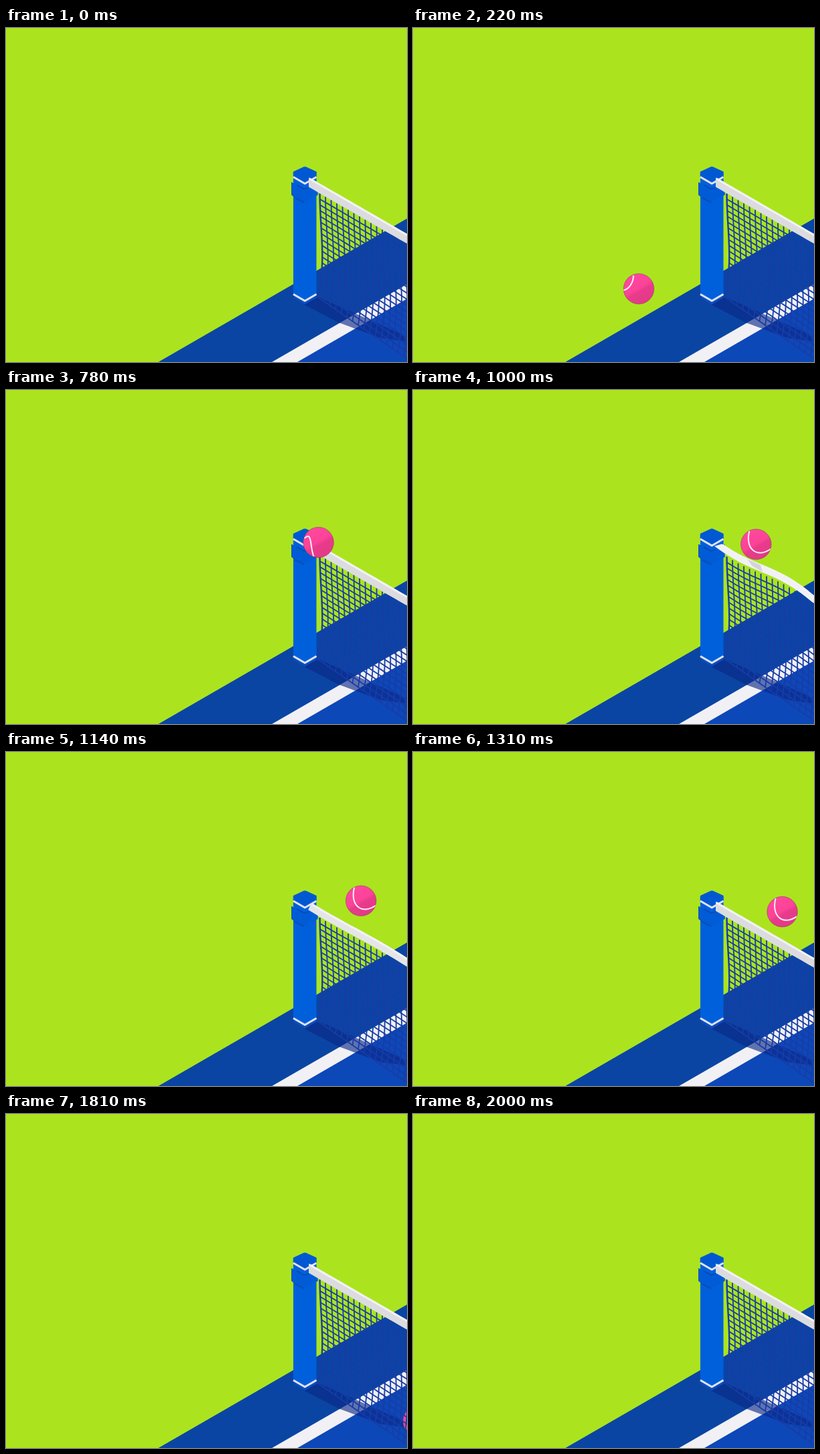
Animation of 600x500 px, one loop 2.5 s. Source, as an HTML page with a canvas:

```html
<!DOCTYPE html>
<html lang="en">
<head>
<meta charset="utf-8">
<title>Net cord</title>
<style>
  html, body { margin: 0; width: 100%; height: 100%; overflow: hidden; background: #abe41f; }
  canvas { display: block; width: 600px; height: 500px; }
</style>
</head>
<body>
<canvas id="stage" width="600" height="500"></canvas>
<script>
const ctx = document.getElementById('stage').getContext('2d');

const LOOP = 2500, STEP = 2000 / 72, LAST = 72;
const HIT = 953;                          // the ball touches the tape
const ISO = Math.tan(Math.PI / 6);        // slope of every ground line
const POST = 447.2, HALF = 17.3;          // post centre and half width
const NET = 453;                          // left end of the tape
const RADIUS = 22.8;
const ROWS = 18, COLS = 18, GAP = 8.5;

const lerp = (a, b, u) => a + (b - a) * u;
const clamp = (v, lo = 0, hi = 1) => Math.min(hi, Math.max(lo, v));
const series = (n, make) => Array.from({ length: n + 1 }, (_, i) => make(i / n));

function trace(points) {
  ctx.beginPath();
  points.forEach(([x, y]) => ctx.lineTo(x, y));
}
function fill(color, points) {
  trace(points);
  ctx.fillStyle = color;
  ctx.fill();
}
function line(color, width, points) {
  trace(points);
  ctx.strokeStyle = color;
  ctx.lineWidth = width;
  ctx.stroke();
}

// Court

// Ground to the right of a line that leaves the bottom edge at x
function ground(color, x) {
  fill(color, [[x, 500], [600, 500 - (600 - x) * ISO], [600, 500]]);
}

function drawCourt() {
  ctx.fillStyle = '#abe41f';
  ctx.fillRect(0, 0, 600, 500);
  ground('#0a45a4', 228);
  ground('#f1f0f4', 398);
  ground('#0d48b9', 436);
  fill('rgba(9,40,134,.62)', [[444, 413], [468, 403], [594, 459], [598, 469], [560, 464], [498, 441]]);
}

// Post

// A band edge seen from above: low in the middle
const vee = (y, grow = 0) => [[POST - HALF - grow, y], [POST, y + 10], [POST + HALF + grow, y]];
const block = (color, y0, y1, grow) => fill(color, [...vee(y0, grow), ...vee(y1, grow).reverse()]);

function drawPost() {
  block('#0a4fc0', 395, 404, -1);
  block('#0060dc', 222, 399);
  line('#e4e3ee', 3, vee(398.5));

  block('#005cd6', 231, 250, 2.2);
  line('#0b48ae', 1, [[427.5, 231], [427.5, 250], [432, 253]]);
  line('#0b48ae', 1.5, [[435, 235], [446, 241], [453, 239]]);
  line('#0c4cb4', 2, [[432, 254], [446, 261]]);

  const cap = [[POST, 208.5], ...vee(216, -1).slice(2), ...vee(222, -1).reverse(), ...vee(216, -1).slice(0, 1)];
  fill('#0059d2', cap);
  line('#0059d2', 2.5, [...cap, cap[0]]);
  line('#e4e3ee', 3, vee(223));
}

// Net

function liftAt(t) {
  const s = t - HIT;
  if (s <= 0 || s > 330) return 0;
  return 9 * Math.min(1, s / 20) * Math.exp(-s / 100) * Math.sin(2 * Math.PI * (s - 14) / 130);
}
// Dips beside the post while it rises further along
function sway(x) {
  const u = clamp((x - NET) / 147);
  return Math.sin(Math.PI * u) * (4 * u - 1.5);
}
const tapeY = (x, drop, lift) => 224 + drop + (x - NET) * ISO - lift * sway(x);

function netPoint(x, u, lift) {
  const bend = 5 * Math.sin(Math.PI * u ** 1.5) - 2 * u;
  const foot = 402 + (x - 467) * .69;
  return [x + bend, lerp(tapeY(x, 14, lift), foot, u)];
}

function drawMesh(lift) {
  const left = 469.5, color = '#183ca6';
  for (let i = 0; i <= COLS; i++) {
    const x = left + i * GAP;
    line(color, i ? 1.8 : 2.4, series(12, u => netPoint(x, u, lift)));
  }
  for (let j = 1; j <= ROWS; j++) {
    line(color, 1.8, series(12, u => netPoint(left + u * COLS * GAP, j / ROWS, lift)));
  }
}

function drawTape(t, lift) {
  const s = t - HIT;
  const twist = s > 0 ? Math.min(1, s / 30) * clamp(1 - (s - 60) / 220) : 0;
  const edge = (from, drop) => series(20, u => {
    const x = lerp(from, 604, u);
    return [x, tapeY(x, drop, lift)];
  });
  const upper = edge(NET + 9 * twist, -5 * twist * 0);
  const lower = edge(NET - 2 * twist, 14 - 3 * twist);
  const tone = lerp(220, 241, twist);
  fill(`rgb(${tone},${tone},${tone + 4})`, [...upper, ...lower.reverse()]);
  line('#f3f2f6', 3, upper.map(([x, y]) => [x + 1, y + 1.5]));

  ctx.globalAlpha = .8 * clamp(1 - Math.abs(t - 985) / 90);
  fill('#c6c5ce', [[500, 1], [520, 1], [523, 10], [508, 8]].map(([x, d]) => [x, tapeY(x, d, lift)]));
  ctx.globalAlpha = 1;
}

// Ball

function ballAt(t) {
  return t < HIT
    ? [384 + .2335 * (t - 420), 227.7 + .000476 * (t - 807) ** 2]
    : [513.3 + .1285 * (t - 1000), 222.7 + .000515 * (t - 1127) ** 2];
}

// Seam curve as the ball rolls: upper left, then an S, then a wide U
const seams = [
  { at: 420, curve: [-8, -20, -8, -9, -15, 1, -23, 2] },
  { at: 780, curve: [-21, -6, -9, -18, -13, 8, -7, 21] },
  { at: 1000, curve: [-10, -20, -17, 8, 2, 21, 22, 7] }
];

function drawSeam(t) {
  const [a, b] = t < seams[1].at ? seams : seams.slice(1);
  const u = clamp((t - a.at) / (b.at - a.at));
  const [x, y, ...rest] = a.curve.map((v, i) => lerp(v, b.curve[i], u));
  ctx.beginPath();
  ctx.moveTo(x, y);
  ctx.bezierCurveTo(...rest);
  ctx.strokeStyle = '#fdeef6';
  ctx.lineWidth = 2;
  ctx.stroke();
}

function drawBall(t) {
  const skin = ctx.createLinearGradient(-10, -18, 11, 19);
  skin.addColorStop(0, '#ff489d');
  skin.addColorStop(.46, '#fb4398');
  skin.addColorStop(.58, '#e83b8b');
  skin.addColorStop(1, '#e43a88');

  ctx.save();
  ctx.translate(...ballAt(t));
  ctx.beginPath();
  ctx.arc(0, 0, RADIUS, 0, 2 * Math.PI);
  ctx.fillStyle = skin;
  ctx.fill();
  ctx.strokeStyle = 'rgba(120,50,90,.6)';
  ctx.lineWidth = .8;
  ctx.stroke();
  ctx.clip();
  drawSeam(t);
  ctx.restore();
}

function draw(t) {
  const lift = liftAt(t);
  const behind = t > 1127;
  drawCourt();
  if (behind) drawBall(t);
  drawPost();
  drawMesh(lift);
  drawTape(t, lift);
  if (!behind) drawBall(t);
}

ctx.lineJoin = 'round';
const began = performance.now();
function tick() {
  const now = (performance.now() - began) % LOOP;
  // the motion runs at 36 steps a second, then rests
  draw(Math.min(LAST, Math.floor((now + 2) / STEP)) * STEP);
  requestAnimationFrame(tick);
}
tick();
</script>
</body>
</html>
```
